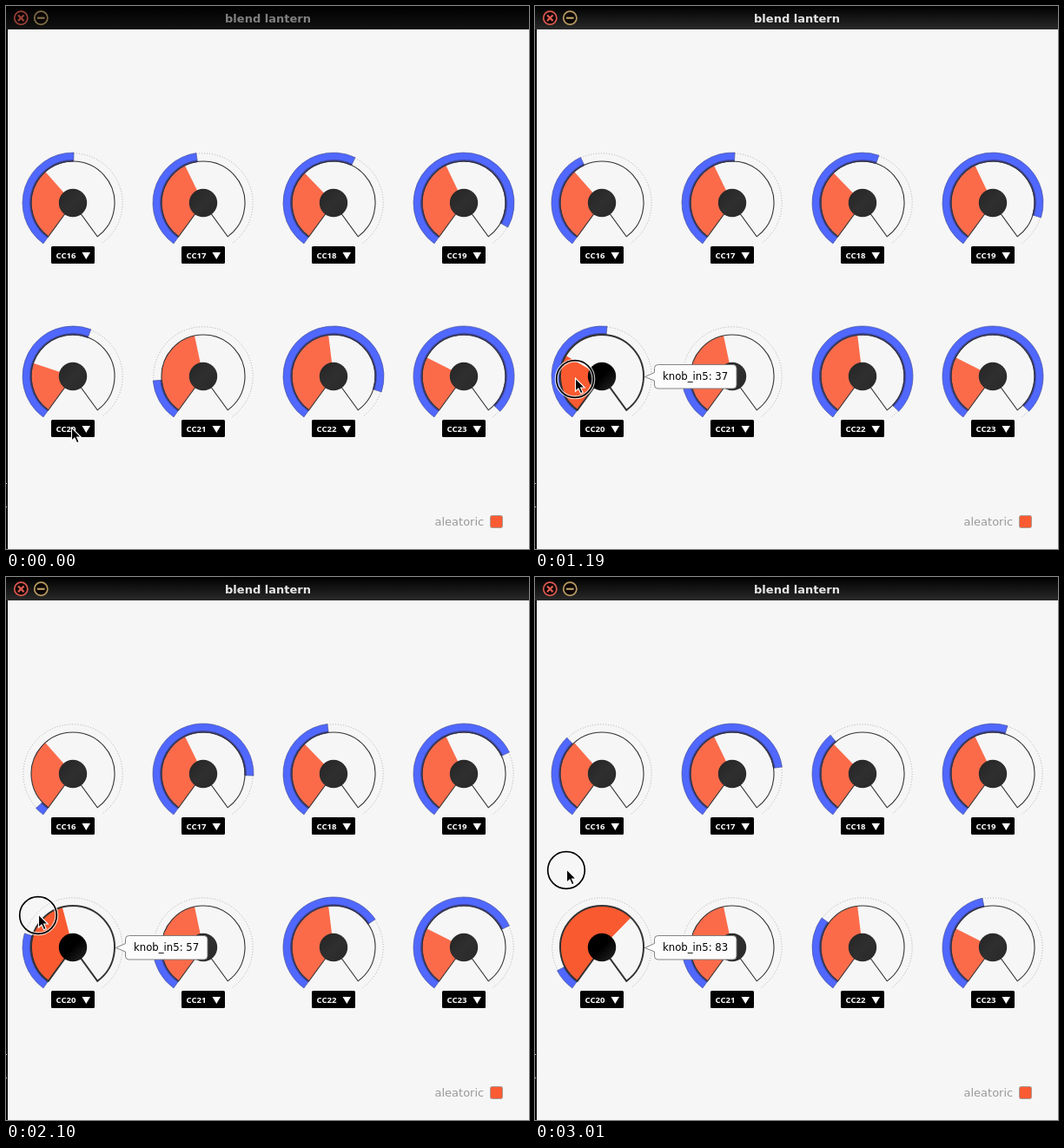
These frames come from a looping animation (602x626 px, 3.08 s). An HTML page:

```html
<!DOCTYPE html>
<html lang="en">
<head>
<meta charset="utf-8">
<title>Knob panel</title>
<style>
  html, body { margin: 0; width: 100%; height: 100%; overflow: hidden; background: #f6f6f6; }
  svg { display: block; width: 602px; height: 626px; }
  text { font-family: "DejaVu Sans", sans-serif; }
  .title { font-weight: bold; font-size: 13px; fill: #808080; text-anchor: middle; }
  .buttons { opacity: .68; }
  .active .title { fill: #e6e6e6; }
  .active .buttons { opacity: 1; }
  .active .bar { fill: url(#barOn); }
  .label { font: bold 9.6px "Noto Sans", "Open Sans", sans-serif; fill: #fff; }
  .knob path { fill: none; }
  .knob .pie { fill: #fb6b4a; }
  .knob .dots { stroke: #999; stroke-width: .8; stroke-dasharray: 1 2; }
  .knob .ring { fill: #5068ff; stroke: #4a539a; stroke-width: .7; }
  .knob .shade { stroke: #3b3c86; stroke-width: 2.4; opacity: .8; }
  .knob .outline { stroke: #333; stroke-width: 1.1; }
  .knob .cap { fill: url(#cap); }
  .hot .pie { fill: #f95a30; }
  .hot .outline { stroke-width: 2; }
  .hot .cap { fill: url(#capHot); }
  .press { visibility: hidden; }
  .active .press { visibility: visible; }
</style>
</head>
<body>
<svg id="stage" viewBox="0 0 602 626">
  <defs>
    <linearGradient id="barOff" x2="0" y2="1">
      <stop stop-color="#000"/><stop offset="1" stop-color="#121212"/>
    </linearGradient>
    <linearGradient id="barOn" x2="0" y2="1">
      <stop stop-color="#000"/><stop offset="1" stop-color="#2a2a2a"/>
    </linearGradient>
    <linearGradient id="cap" x2="1" y2="1">
      <stop stop-color="#242424"/><stop offset=".5" stop-color="#2f2f2f"/><stop offset="1" stop-color="#282828"/>
    </linearGradient>
    <linearGradient id="capHot" x2="1" y2="1">
      <stop offset=".5" stop-color="#000"/><stop offset="1" stop-color="#282828"/>
    </linearGradient>
  </defs>
  <rect width="602" height="626" fill="#f6f6f6"/>
  <rect width="2" height="626"/>
  <path d="M0 550.5h1M0 577.5h1" stroke="#ddd"/>
  <rect class="bar" width="602" height="27" fill="url(#barOff)"/>
  <g class="buttons" fill="#0c0505" stroke-width="1.7">
    <g stroke="#dc5a4e">
      <circle cx="17.3" cy="13.8" r="7.6"/>
      <path d="M14 10.5l6.6 6.6M20.6 10.5l-6.6 6.6" stroke-width="2.2"/>
    </g>
    <g stroke="#b89c62">
      <circle cx="40.3" cy="13.8" r="7.6"/>
      <path d="M36 13.8h8.6" stroke-width="2.2"/>
    </g>
  </g>
  <text class="title" x="301.5" y="18.5">blend lantern</text>
  <g id="knobs"></g>
  <text x="493.5" y="599" font-size="13" fill="#999">aleatoric</text>
  <rect x="557.5" y="587.5" width="14" height="14" rx="2" fill="#fb5b33" stroke="#a89a94"/>
  <g class="press">
    <path d="M141.500 413.500H228a4 4 0 0 1 4 4V437a4 4 0 0 1-4 4H141.500a4 4 0 0 1-4-4V432L126.500 427.500L137.500 422.500V417.500a4 4 0 0 1 4-4Z" fill="#fcfcfc" stroke="#777" stroke-width=".9"/>
    <text id="readout" x="147" y="431" font-size="11.7"></text>
  </g>
  <g id="pointer">
    <g class="press" fill="none">
      <circle r="21.300" stroke="#fff" stroke-width="4" opacity=".75"/>
      <circle r="21.300" stroke="#000" stroke-width="1.7"/>
    </g>
    <path d="M.5-1V14.200L4 11L6.600 16.800L9.200 15.600L6.600 10H11.300Z" stroke="#fff" stroke-width="1.100"/>
  </g>
</svg>
<script>
const LOOP = 3080, STEP = 70, PRESS = 630;
const LIMIT = 144;   // degrees either side of straight up
const INNER = 48, OUTER = 58;
const $ = id => document.getElementById(id);

// The dragged value over time, and the pointer's x for those values.
const times = [700, 1190, 1750, 2100, 2450, 3010];
const values = [32, 37, 47, 57, 66, 83];
const dragX = [49, 46, 42, 37, 34, 36];

// Each knob: pie angle, then the ring angle at each of the values above.
const setup = [
  [-41.5, [1, -25, -68, -133, -125, -44]],
  [-26, [-8, 3, 45, 92, 123, 82]],
  [-44, [25.5, 19, 7, -7, -16, -39.5]],
  [-25.5, [119, 107, 90, 64.5, 54, 17]],
  [0, [21, 6, -28, -74, -100, -117.5]],
  [-12, [-95, -95, -95, -95, -95, -95]],
  [-7, [108, 134, 114, 56, 23.5, -54]],
  [-63, [134, 134, 104, 64.5, 42, -12]]
];

const clamp = (x, lo, hi) => Math.min(hi, Math.max(lo, x));

// Smooth curve through the given points.
function curve(xs, ys, x) {
  const last = xs.length - 1;
  x = clamp(x, xs[0], xs[last]);
  let i = 0;
  while (i < last - 1 && x > xs[i + 1]) i++;
  const slope = k => {
    const a = Math.max(k - 1, 0), b = Math.min(k + 1, last);
    return (ys[b] - ys[a]) / (xs[b] - xs[a]);
  };
  const h = xs[i + 1] - xs[i], u = (x - xs[i]) / h, w = 1 - u;
  return ys[i] * w * w * (1 + 2 * u) + ys[i + 1] * u * u * (3 - 2 * u)
    + h * u * w * (w * slope(i) - u * slope(i + 1));
}

function polar(r, deg) {
  const a = deg * Math.PI / 180;
  return `${(r * Math.sin(a)).toFixed(2)} ${(-r * Math.cos(a)).toFixed(2)}`;
}
function arcTo(r, from, to) {
  return `A${r} ${r} 0 ${+(Math.abs(to - from) > 180)} ${+(to > from)} ${polar(r, to)}`;
}
const arc = (r, from, to) => `M${polar(r, from)}${arcTo(r, from, to)}`;
const pie = to => `M0 0L${polar(INNER, -LIMIT)}${arcTo(INNER, -LIMIT, to)}Z`;
const band = to => `${arc(OUTER, -LIMIT, to)}L${polar(INNER, to)}${arcTo(INNER, to, -LIMIT)}Z`;

$('knobs').innerHTML = setup.map(([angle], i) => `
  <g class="knob" transform="translate(${77 + i % 4 * 150} ${i < 4 ? 227 : 427})">
    <path class="dots"/>
    <path class="pie" d="${pie(angle)}"/>
    <path class="ring"/>
    <path class="shade"/>
    <path class="outline" d="${pie(LIMIT)}"/>
    <circle class="cap" r="16.2"/>
    <rect x="-25" y="50" width="50" height="20" rx="1.5"/>
    <text class="label" x="-19.500" y="64">CC${16 + i}</text>
    <path d="M10.500 57H20L15.250 65Z" style="fill:#fff"/>
  </g>`).join('');

const knobs = [...document.querySelectorAll('.knob')].map(node => {
  const part = name => node.querySelector('.' + name);
  return { node, dots: part('dots'), pie: part('pie'), ring: part('ring'), shade: part('shade') };
});

function draw(t) {
  const pressed = t >= PRESS;
  const value = Math.round(curve(times, values, t));

  knobs.forEach((k, i) => {
    const tip = clamp(curve(values, setup[i][1], value), -LIMIT + 1, LIMIT - 1);
    k.ring.setAttribute('d', band(tip));
    k.shade.setAttribute('d', arc(INNER + .7, -LIMIT, tip));
    k.dots.setAttribute('d', arc(OUTER - .8, tip, LIMIT));
  });
  knobs[4].pie.setAttribute('d', pie(-LIMIT + 2 * LIMIT * value / 127));
  knobs[4].node.classList.toggle('hot', pressed);

  $('stage').classList.toggle('active', pressed);
  $('readout').textContent = 'knob_in5: ' + value;

  let x = curve(values, dragX, value), y = 440 - 2 * (value - 32);
  if (!pressed) {
    const u = t / PRESS, ease = u * u * (3 - 2 * u);
    x = 75 - 26 * ease;
    y = 487 - 47 * ease;
  }
  $('pointer').setAttribute('transform', `translate(${x.toFixed(1)} ${y.toFixed(1)})`);
}

const start = performance.now();
function tick() {
  const t = (performance.now() - start) % LOOP;
  draw(Math.floor(t / STEP) * STEP);
  requestAnimationFrame(tick);
}
tick();
</script>
</body>
</html>
```
